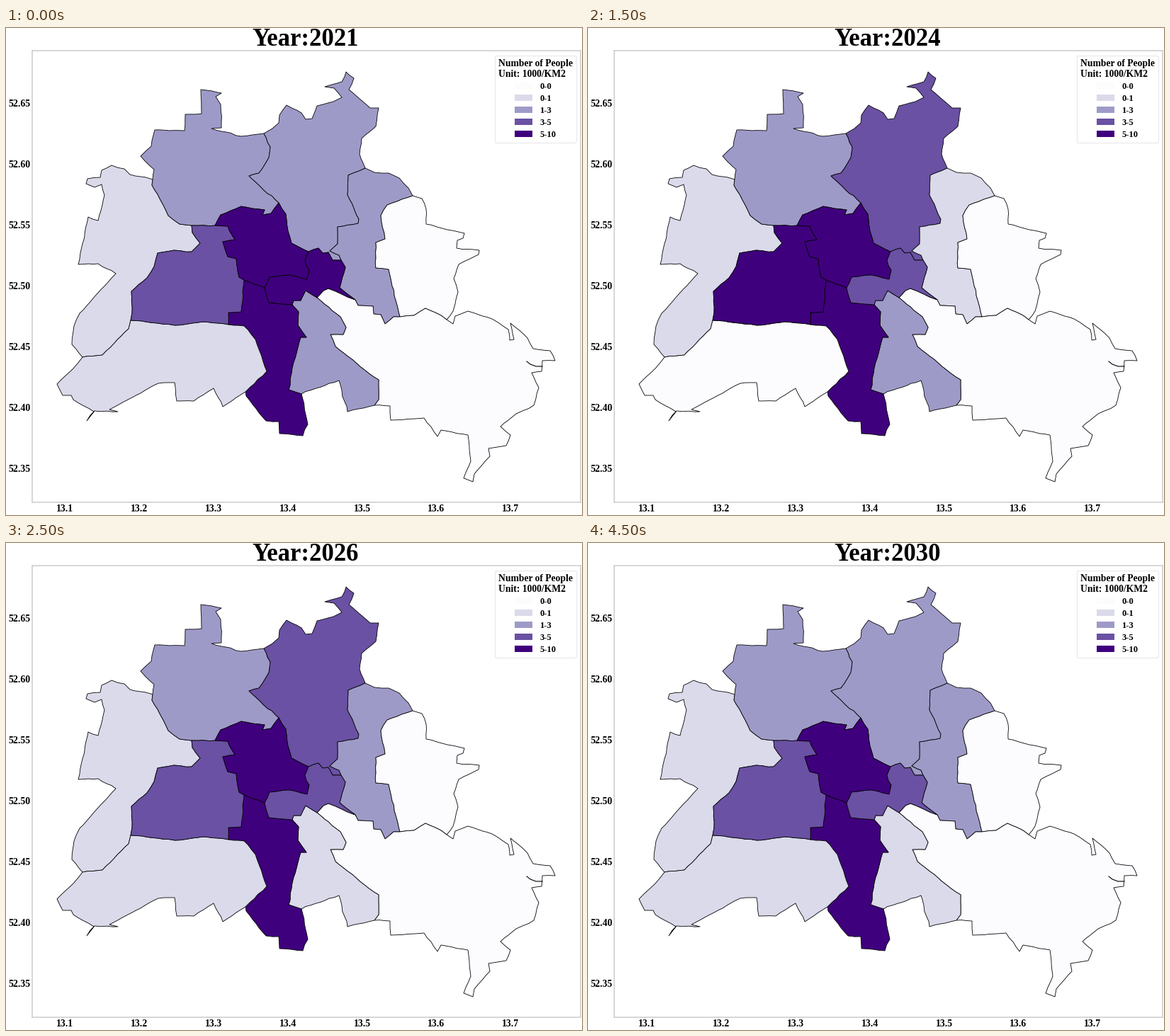
A matplotlib script that plays this animation: 813 px wide and 688 px high, repeating every 5000 ms.

```python
import matplotlib.pyplot as plt
import numpy as np
from matplotlib.animation import FuncAnimation
from matplotlib.patches import Patch, Polygon

plt.rcParams.update({"font.family": "Liberation Serif", "font.weight": "bold"})

W, H, DPI = 813, 688, 100
LEFT, TOP, RIGHT, BOTTOM = 37, 32.5, 811, 670
FIRST_YEAR, YEARS = 2021, 10
SHADES = ["#fcfbfd", "#dadaeb", "#9e9ac8", "#6a51a3", "#3f007d"]
RANGES = ["0-0", "0-1", "1-3", "3-5", "5-10"]

rng = np.random.default_rng(4)

# Points where three areas meet, in stage pixels
NODES = dict(
    A=(207, 214), B=(364, 149), C=(507, 198), D=(574, 237), E=(622, 412),
    F=(520, 533), G=(417, 517), H=(338, 514), I=(108, 465), J=(262, 279),
    K=(295, 279), L=(385, 247), M=(427, 316), N=(473, 328), O=(493, 384),
    P=(556, 408), Q=(439, 381), R=(404, 391), S=(365, 367), T=(336, 356),
    U=(314, 419), V=(176, 413))
borders = {}


def roughen(pts, step=7, size=0.4):
    """Split long edges and nudge the new points, so lines look surveyed."""
    out = [pts[0]]
    for a, b in zip(pts, pts[1:]):
        n = max(1, int(np.hypot(*np.subtract(b, a)) // step))
        edge = np.linspace(a, b, n + 1)[1:]
        edge[:-1] += rng.normal(0, size, (n - 1, 2))
        out.extend(edge)
    return np.array(out)


def border(ends, *bends):
    a, b = ends
    line = roughen([NODES[a], *bends, NODES[b]])
    borders[a + b], borders[b + a] = line, line[::-1]


def outline(nodes):
    """Walk the borders from node to node and back to the start."""
    return np.concatenate([borders[a + b] for a, b in zip(nodes, nodes[1:] + nodes[0])])


# Outer edge, clockwise from the west
border("IA", (93, 447), (96, 421), (104, 403), (155, 347), (130, 333), (102, 334),
       (116, 267), (130, 272), (139, 236), (135, 221), (125, 225), (113, 220),
       (115, 213), (133, 211), (135, 201), (149, 194), (167, 199), (175, 207),
       (204, 213))
border("AB", (209, 200), (190, 181), (205, 167), (210, 144), (252, 145), (253, 122),
       (276, 121), (275, 87), (304, 92), (296, 97), (303, 108), (304, 141),
       (290, 142), (331, 153))
border("BC", (376, 142), (385, 134), (386, 123), (396, 109), (417, 120), (423, 129),
       (432, 128), (439, 110), (462, 104), (474, 98), (463, 85), (450, 83),
       (474, 76), (480, 62), (491, 71), (484, 87), (514, 113), (526, 113),
       (522, 139), (502, 156), (499, 178))
border("CD", (520, 204), (540, 205), (555, 212), (568, 226))
border("DE", (587, 241), (593, 256), (593, 277), (647, 290), (645, 297), (637, 300),
       (636, 311), (668, 314), (667, 320), (639, 334), (632, 354), (638, 373),
       (631, 400))
border("EF", (631, 418), (634, 407), (652, 400), (686, 411), (709, 426), (711, 441),
       (717, 440), (712, 417), (736, 438), (744, 453), (768, 456), (775, 470),
       (757, 470), (756, 485), (742, 487), (752, 508), (745, 533), (720, 545),
       (698, 563), (712, 575), (706, 590), (681, 594), (683, 605), (661, 630),
       (659, 641), (646, 636), (656, 612), (652, 575), (614, 568), (609, 577),
       (590, 551), (543, 554), (542, 534))
border("FG", (482, 542), (470, 498))
border("GH", (426, 560), (419, 576), (386, 573), (385, 556), (367, 555), (339, 520))
border("HI", (306, 535), (293, 509), (265, 527), (241, 527), (238, 501), (215, 502),
       (146, 539), (158, 542), (125, 541), (114, 555), (124, 542), (95, 525),
       (92, 519), (80, 519), (72, 503), (95, 481))

# Inner borders
border("AJ", (206, 222), (214, 235), (229, 265), (245, 277))
border("JV", (263, 289), (274, 304), (262, 316), (237, 314), (214, 318), (209, 337),
       (199, 353), (177, 372), (178, 402))
border("VI", (173, 425), (136, 462))
border("JK")
border("KL", (303, 264), (332, 252), (365, 257), (362, 264), (374, 262))
border("BL", (373, 168), (371, 183), (357, 205), (343, 209))
border("LM", (395, 263), (398, 287), (403, 304))
border("MS", (422, 328), (428, 342), (425, 355), (399, 349), (372, 352))
border("KT", (313, 280), (323, 299), (306, 302), (313, 323), (325, 326), (329, 352))
border("ST")
border("TU", (332, 401), (314, 402))
border("VU", (238, 420), (278, 415))
border("UH", (336, 421), (352, 440), (368, 485))
border("SR", (371, 388))
border("RQ", (406, 385), (416, 385), (423, 371))
border("MN", (441, 311), (447, 318), (455, 317), (461, 328))
border("NO", (479, 338), (471, 367))
border("QO", (448, 371), (455, 368), (474, 376))
border("CN", (483, 208), (482, 236), (498, 270), (497, 276), (468, 281), (468, 305),
       (457, 315), (470, 321))
border("DP", (538, 250), (529, 265), (535, 298), (522, 303), (522, 339), (540, 341))
border("OP", (497, 392), (518, 393), (519, 404), (529, 405), (535, 418), (547, 408))
border("PE", (576, 406), (592, 396), (606, 402))
border("GR", (399, 511), (404, 480), (416, 437), (424, 437), (412, 420), (413, 401))
border("FQ", (526, 525), (526, 497), (506, 483), (465, 450), (458, 433), (476, 433),
       (480, 423), (472, 408))

# Nodes around each district, and its density class from each year on
DISTRICTS = {
    "AJVI": {2021: 1, 2023: 0, 2024: 1},
    "ABLKJ": {2021: 2},
    "BCNML": {2021: 2, 2022: 3, 2030: 2},
    "CDPON": {2021: 2, 2022: 1, 2023: 2, 2024: 1, 2025: 2},
    "DEP": {2021: 0},
    "EFQOP": {2021: 0},
    "FGRQ": {2021: 2, 2026: 1},
    "GHUTSR": {2021: 4, 2025: 3, 2026: 4},
    "HIVU": {2021: 1, 2023: 0, 2026: 1},
    "JKTUV": {2021: 3, 2024: 4, 2025: 3, 2029: 4, 2030: 3},
    "KLMST": {2021: 4},
    "MNOQRS": {2021: 4, 2024: 3},
}

fig = plt.figure(figsize=((W + 0.01) / DPI, (H + 0.01) / DPI), dpi=DPI,
                 facecolor="white")
ax = fig.add_axes([LEFT / W, 1 - BOTTOM / H, (RIGHT - LEFT) / W, (BOTTOM - TOP) / H])
ax.set_xlim(LEFT, RIGHT)
ax.set_ylim(BOTTOM, TOP)
ax.set_xticks([83.4 + 104.8 * i for i in range(7)],
              [f"{13.1 + 0.1 * i:.1f}" for i in range(7)])
ax.set_yticks([622 - 86 * i for i in range(7)],
              [f"{52.35 + 0.05 * i:.2f}" for i in range(7)])
ax.tick_params(length=0, labelsize=10, pad=2)
for spine in ax.spines.values():
    spine.set(color="0.8", linewidth=1.1)

title = ax.set_title("", fontsize=25, fontweight="bold", pad=4.5, x=0.4985)
shapes = [ax.add_patch(Polygon(outline(nodes), edgecolor="black",
                               linewidth=0.6, joinstyle="round"))
          for nodes in DISTRICTS]
ax.plot([735, 740, 748, 757], [471, 475, 478, 478], color="black", linewidth=0.8)

ax.legend(handles=[Patch(color=c, label=t, linewidth=0)
                   for c, t in zip(SHADES, RANGES)],
          title="Number of People\nUnit: 1000/KM2", loc="upper right",
          fontsize=9, title_fontproperties={"weight": "bold", "size": 9.8},
          labelspacing=0.4, edgecolor="0.9", framealpha=0.8)


def draw(i):
    year = FIRST_YEAR + i
    title.set_text(f"Year:{year}")
    for shape, levels in zip(shapes, DISTRICTS.values()):
        since = max(y for y in levels if y <= year)
        shape.set_facecolor(SHADES[levels[since]])
    return [title, *shapes]


anim = FuncAnimation(fig, draw, frames=YEARS, init_func=lambda: draw(0),
                     interval=500, repeat=True, repeat_delay=0)
plt.show()
```
